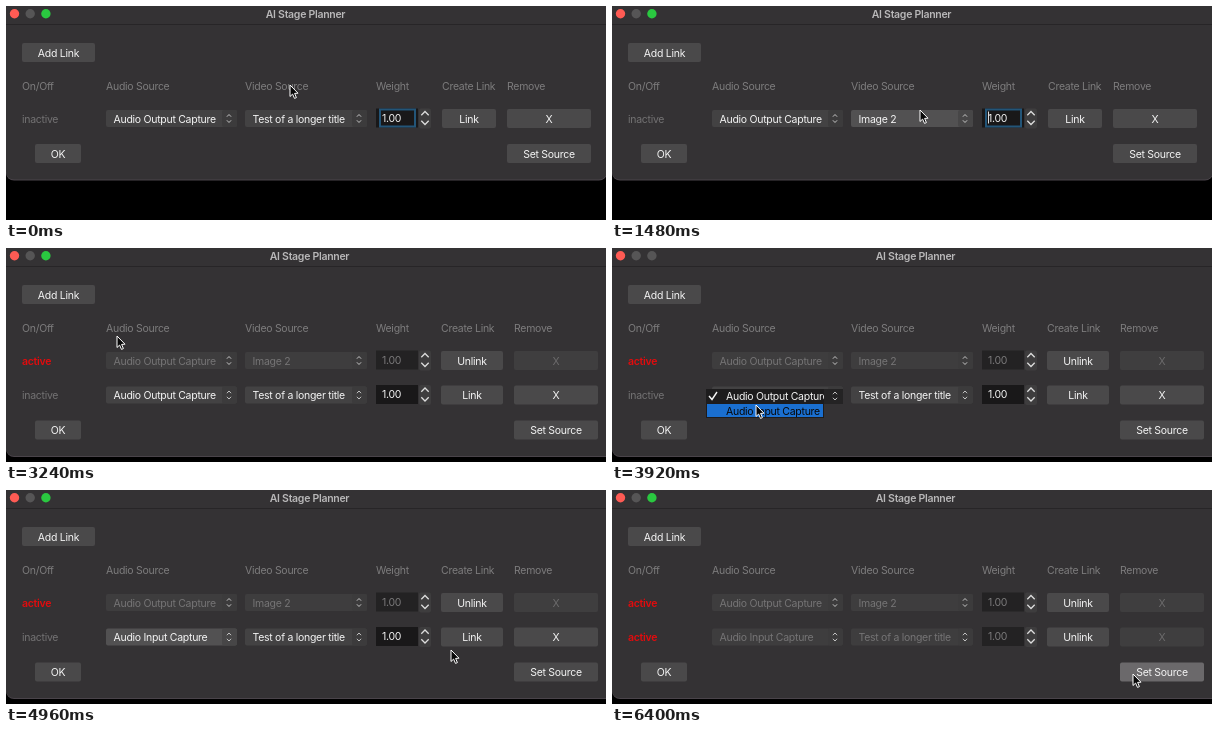
Write an HTML page with a canvas that moves like this. It is 600 px wide and 214 px high and loops after 6520 ms.

```html
<!DOCTYPE html>
<html lang="en">
<head>
<meta charset="utf-8">
<title>AI Stage Planner</title>
<style>
html, body { margin: 0; width: 100%; height: 100%; overflow: hidden; background: #000; }
canvas { display: block; }
</style>
</head>
<body>
<canvas id="stage" width="600" height="214"></canvas>
<script>
const g = document.getElementById('stage').getContext('2d');
const LOOP = 6520, PITCH = 34.5;
const WHITE = '#f4f4f4', BLACK = '#080808';
const OUTPUT = 'Audio Output Capture', INPUT = 'Audio Input Capture';
const LONG = 'Test of a longer title', SHORT = 'Image 2';

// Event times in ms
const added = 3040, linked = [1760, 5360];
const videoMenu = [520, 1040], audioMenu = [3720, 4440];

// Pointer moves from its start: begin, end, x, y
const start = [284, 79];
const moves = [
  [240, 640, 297, 124],
  [1040, 1480, 308, 104],
  [1480, 1680, 464, 106],
  [2360, 2570, 52, 40],
  [3040, 3240, 111, 88],
  [3240, 3680, 141, 148],
  [3720, 3880, 144, 157],
  [4720, 4960, 445, 160],
  [4960, 5160, 468, 149],
  [5400, 6080, 521, 184]
];
const arrow = new Path2D('M0 0V11.5L2.6 9.1L4.5 13.4L6.4 12.6L4.6 8.4L8 8.2Z');

const within = (t, [a, b]) => t >= a && t < b;

function pointer(t) {
  let [x, y] = start;
  for (const [a, b, toX, toY] of moves) {
    const u = Math.min(1, Math.max(0, (t - a) / (b - a)));
    const e = u * u * (3 - 2 * u);
    x += (toX - x) * e;
    y += (toY - y) * e;
  }
  return [x, y];
}

function box(x, y, w, h, color, r = 0) {
  g.fillStyle = color;
  g.beginPath();
  g.roundRect(x, y, w, h, r);
  g.fill();
}

function text(s, x, y, color, align = 'left', weight = 400) {
  g.font = `${weight} 10.5px Inter, sans-serif`;
  g.letterSpacing = '-0.28px';
  g.textAlign = align;
  g.fillStyle = color;
  g.fillText(s, x, y + 4);
}

function line(points, color, width) {
  g.strokeStyle = color;
  g.lineWidth = width;
  g.beginPath();
  points.forEach(([x, y]) => g.lineTo(x, y));
  g.stroke();
}

// Up and down arrow heads around (x, y)
function arrows(x, y, w, gap, h, color, width) {
  for (const d of [-1, 1]) {
    line([[x - w, y + d * gap], [x, y + d * (gap + h)], [x + w, y + d * gap]], color, width);
  }
}

function button(s, x, y, w, { off, lit } = {}) {
  box(x, y - 9.5, w, 19, lit ? '#6b696b' : off ? '#3f3e3f' : '#4a494a', 2);
  text(s, x + w / 2, y, off ? '#6c6b6c' : WHITE, 'center');
}

function combo(s, x, y, w, off, lit) {
  box(x, y - 8.5, w, 17, off ? '#3e3d3e' : lit ? '#525152' : '#434243', 2);
  box(x + w - 15, y - 8.5, 15, 17, lit ? '#474647' : '#3c3b3c', 2);
  text(s, x + 7.5, y, off ? '#757475' : WHITE);
  arrows(x + w - 8, y, 2.1, 1.8, 2.2, '#c4c4c4', 1);
}

function weight(y, off, focus, caret) {
  box(370, y - 10, 42, 19, off ? '#232223' : '#191819');
  if (focus) {
    g.strokeStyle = '#235578';
    g.lineWidth = 2;
    g.strokeRect(374, y - 9, 35, 17);
  }
  text('1.00', 376, y - 1, off ? '#7a797a' : WHITE);
  if (caret) box(376, y - 7, 1, 12, '#ddd');
  box(413, y - 10, 12, 20, '#3e3d3e', 2);
  arrows(419, y - .5, 3.7, 2.8, 3.7, '#ddd', 1.3);
}

// Two-item menu over a combo; its first item covers the arrow cell
function menu(items, x, y, w, cy) {
  const hot = cy > y + 7 ? 1 : 0;
  box(x, y - 7, w + 19, 15, '#242324');
  box(x, y - 7, w, 29, '#1d1c1d');
  box(x + 1, y - 6 + hot * 14, w - 2, 13, '#1a6fd0');
  arrows(x + w + 11, y, 2.1, 1.8, 2.2, '#c4c4c4', 1);
  g.save();
  g.beginPath();
  g.rect(x, y - 7, w, 29);
  g.clip();
  items.forEach((s, i) => text(s, x + 20, y + i * 14.5, i === hot ? BLACK : WHITE));
  line([[x + 3, y], [x + 6, y + 3.5], [x + 11, y - 4]], hot ? WHITE : BLACK, 1.4);
  g.restore();
}

function row(i, t, linkX, linkW, removeX) {
  const y = 112.5 + i * PITCH, on = t >= linked[i];
  const audioPicked = i === 1 && t >= audioMenu[1];
  const videoPicked = i === 0 && t >= videoMenu[1];
  const focus = i === 0 && !on;
  text(on ? 'active' : 'inactive', 16, y, on ? '#e30b0d' : '#737273', 'left', on ? 600 : 400);
  combo(audioPicked ? INPUT : OUTPUT, 100, y, 131, on, audioPicked && !on);
  combo(videoPicked ? SHORT : LONG, 239, y, 122, on, videoPicked && t < 1560);
  weight(y, on, focus, focus && Math.floor((t + 260) / 500) % 2);
  button(on ? 'Unlink' : 'Link', linkX, y, linkW, { lit: within(t, [linked[i] - 80, linked[i]]) });
  button('X', removeX, y, 84, { off: on });
}

function cursor(x, y) {
  g.save();
  g.translate(x, y);
  g.fillStyle = BLACK;
  g.fill(arrow);
  g.strokeStyle = '#fff';
  g.lineWidth = 1;
  g.stroke(arrow);
  g.restore();
}

function draw(t) {
  const wide = t >= linked[0], rows = t >= added ? 2 : 1;
  const bottom = 174 + (rows - 1) * PITCH, footer = bottom - 26.5;
  const linkX = wide ? 435 : 436, linkW = wide ? 62 : 54, removeX = wide ? 508 : 501;
  const menuOpen = within(t, videoMenu) || within(t, audioMenu);
  const [cx, cy] = pointer(t);

  box(0, 0, 600, 214, '#000');
  box(0, -10, wide ? 610 : 601, bottom + 10.5, '#4a444a', 8);
  box(0, -10, wide ? 610 : 601, bottom + 9.5, '#343234', 8);
  box(0, 18, 600, 1, '#272527');

  ['#ff5b54', '#565556', menuOpen ? '#565556' : '#2ac840']
    .forEach((color, i) => box(3.8 + i * 15.7, 3.1, 9.4, 9.4, color, 4.7));
  text('AI Stage Planner', wide ? 303.5 : 299.5, 7.5, '#b9b8b9', 'center', 600);

  button('Add Link', 16, 46.5, 73, { lit: within(t, [added - 160, added]) });
  const heads = { 'On/Off': 16, 'Audio Source': 100, 'Video Source': 239, 'Weight': 370,
    'Create Link': linkX, 'Remove': removeX };
  for (const s in heads) text(s, heads[s], 79.5, '#7d7c7d');

  for (let i = 0; i < rows; i++) row(i, t, linkX, linkW, removeX);
  button('OK', 29, footer, 46);
  button('Set Source', removeX, footer, 84, { lit: t >= 6320 });

  if (within(t, videoMenu)) menu([LONG, SHORT], 233, 113, 109, cy);
  if (within(t, audioMenu)) menu([OUTPUT, INPUT], 94, 148, 118, cy);
  cursor(cx, cy);
}

function tick(now) {
  draw(now % LOOP);
  requestAnimationFrame(tick);
}
requestAnimationFrame(tick);
</script>
</body>
</html>
```
